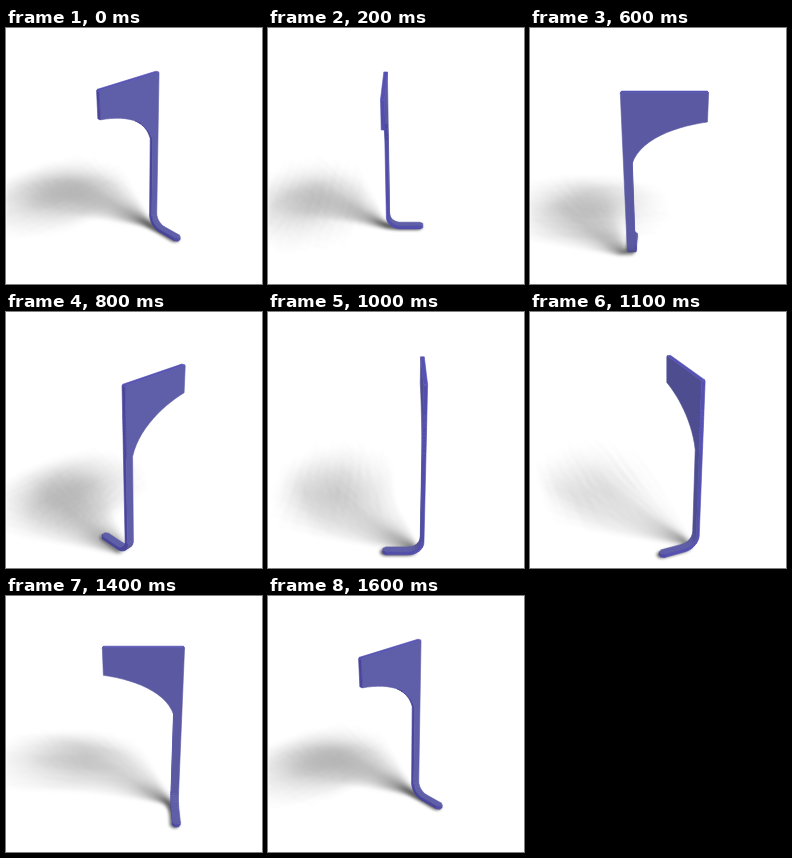
These frames come from a looping animation (256x256 px, 1700 ms). An HTML page with a canvas:

```html
<!DOCTYPE html>
<html>
<head>
<meta charset="utf-8">
<style>
html, body { margin: 0; width: 100%; height: 100%; overflow: hidden; background: #fff; }
canvas { display: block; width: 100vw; height: 100vh; }
</style>
</head>
<body>
<canvas id="stage" width="256" height="256"></canvas>
<script>
const SIZE = 256, STEP = 100, STEPS = 17;
const ctx = document.getElementById('stage').getContext('2d');
const shadowCanvas = document.createElement('canvas');
shadowCanvas.width = shadowCanvas.height = SIZE;
const shadowCtx = shadowCanvas.getContext('2d');

const TOP = 169.5, BLADE = 71.5, STEM = 7.5, HALF = 1.6, BEND = 13, FOOT = 36.5, FLOOR = 2.8;
const CAMERA = { x: 136, y: 128, focal: 492, back: 396, height: 305, pitch: 27.1 * Math.PI / 180 };
const LIGHT = [0.43, -0.43, 0.79];

const sub = (a, b) => a.map((v, i) => v - b[i]);
const dot = (a, b) => a[0] * b[0] + a[1] * b[1] + a[2] * b[2];
const cross = (a, b) => [a[1] * b[2] - a[2] * b[1], a[2] * b[0] - a[0] * b[2], a[0] * b[1] - a[1] * b[0]];
const mean = pts => [0, 1, 2].map(i => pts.reduce((sum, p) => sum + p[i], 0) / pts.length);
const bezier = (t, a, b, c, d) => {
  const u = 1 - t;
  return u * u * u * a + 3 * u * u * t * b + 3 * u * t * t * c + t * t * t * d;
};

// The bent sheet as rows from blade to foot: position, tilt of its normal, extent along the blade.
function buildRows() {
  const rows = [];
  const add = (n, z, tilt, from, to) => rows.push({ n, z, tilt, from, to });
  add(0, TOP, 0, 0.8, BLADE - 0.8);
  add(0, TOP - 1, 0, 0, BLADE);
  for (let i = 0; i <= 14; i++) {
    const t = i / 14;
    add(0, bezier(t, 143.5, 139.5, 128, 104), 0, 0, bezier(t, BLADE, 45, 15, STEM));
  }
  for (let i = 0; i <= 8; i++) {
    const a = i / 8 * Math.PI / 2;
    add(BEND - BEND * Math.cos(a), FLOOR + BEND - BEND * Math.sin(a), a, 0, STEM);
  }
  add(FOOT - 3, FLOOR, Math.PI / 2, 0, STEM);
  add(FOOT, FLOOR, Math.PI / 2, 2, STEM - 2);
  return rows;
}
const rows = buildRows();
const flatCount = rows.filter(r => r.tilt === 0).length;

function toWorld(s, n, z, angle) {
  const u = s - 37, v = n - 16.7, c = Math.cos(angle), d = Math.sin(angle);
  return [u * c - v * d, u * d + v * c, z];
}

function project([x, away, z]) {
  const c = Math.cos(CAMERA.pitch), s = Math.sin(CAMERA.pitch);
  const far = away + CAMERA.back, low = CAMERA.height - z;
  const scale = CAMERA.focal / (far * c + low * s);
  return [CAMERA.x + x * scale, CAMERA.y - (far * s - low * c) * scale];
}

function trace(g, pts) {
  g.beginPath();
  pts.forEach(p => g.lineTo(...project(p)));
  g.closePath();
}

// Many faint shadows from points spread over a round lamp give a soft edge.
function drawShadow(angle) {
  const outline = [
    ...rows.map(r => toWorld(r.from, r.n, r.z, angle)),
    ...rows.map(r => toWorld(r.to, r.n, r.z, angle)).reverse()
  ];
  shadowCtx.clearRect(0, 0, SIZE, SIZE);
  shadowCtx.fillStyle = shadowCtx.strokeStyle = 'rgba(0,0,0,0.008)';
  shadowCtx.lineWidth = 2;
  const samples = 110;
  for (let i = 0; i < samples; i++) {
    const r = 0.4 * Math.pow((i + 0.5) / samples, 0.6), a = i * 2.4;
    const dx = -0.58 + r * Math.cos(a), dy = 0.56 + r * Math.sin(a);
    trace(shadowCtx, outline.map(([x, y, z]) => [x + z * dx, y + z * dy, 0]));
    shadowCtx.fill();
    shadowCtx.stroke();
  }
  ctx.filter = 'blur(1.5px)';
  ctx.drawImage(shadowCanvas, 0, 0);
  ctx.filter = 'none';
}

function shade(normal, isFace) {
  const lit = Math.max(0, Math.min(1, dot(normal, LIGHT) / 0.61));
  const [dark, light] = isFace ? [[78, 77, 144], [95, 94, 168]] : [[72, 69, 154], [86, 82, 180]];
  return `rgb(${dark.map((v, i) => Math.round(v + (light[i] - v) * lit))})`;
}

function drawHook(angle) {
  const eye = [0, -CAMERA.back, CAMERA.height];
  const corners = rows.map(r => {
    const dn = HALF * Math.cos(r.tilt), dz = HALF * Math.sin(r.tilt);
    const at = (s, side) => toWorld(s, r.n + side * dn, r.z + side * dz, angle);
    return [at(r.from, 1), at(r.to, 1), at(r.to, -1), at(r.from, -1)];
  });
  const faces = [];
  const addFace = (pts, inside, isFace) => {
    const mid = mean(pts);
    let normal = cross(sub(pts[pts.length / 2], pts[0]), sub(pts[pts.length - 1], pts[1]));
    const sign = Math.sign(dot(normal, sub(mid, inside))) / Math.hypot(...normal);
    normal = normal.map(v => v * sign);
    const view = sub(eye, mid);
    if (dot(normal, view) > 0) faces.push({ pts, color: shade(normal, isFace), far: Math.hypot(...view) });
  };

  // Blade and stem are flat, so each of their two sides is a single face.
  const flat = corners.slice(0, flatCount), core = mean(flat.flat());
  for (const [a, b] of [[0, 1], [3, 2]]) {
    addFace([...flat.map(c => c[a]), ...flat.map(c => c[b]).reverse()], core, true);
  }
  for (let i = 0; i + 1 < corners.length; i++) {
    const a = corners[i], b = corners[i + 1], inside = mean([...a, ...b]);
    for (let k = 0; k < 4; k++) {
      const m = (k + 1) % 4, isFace = k % 2 === 0;
      if (!isFace || i + 1 >= flatCount) addFace([a[k], a[m], b[m], b[k]], inside, isFace);
    }
    if (i === 0) addFace(a, inside, false);
    if (i + 2 === corners.length) addFace(b, inside, false);
  }

  ctx.lineWidth = 0.6;
  ctx.lineJoin = 'round';
  faces.sort((p, q) => q.far - p.far).forEach(({ pts, color }) => {
    ctx.fillStyle = ctx.strokeStyle = color;
    trace(ctx, pts);
    ctx.fill();
    ctx.stroke();
  });
}

let shown = -1;
function tick() {
  const step = Math.floor(performance.now() / STEP) % STEPS;
  if (step !== shown) {
    shown = step;
    const angle = (225 + step * 360 / (STEPS - 1)) * Math.PI / 180;
    ctx.fillStyle = '#fff';
    ctx.fillRect(0, 0, SIZE, SIZE);
    drawShadow(angle);
    drawHook(angle);
  }
  requestAnimationFrame(tick);
}
tick();
</script>
</body>
</html>
```
